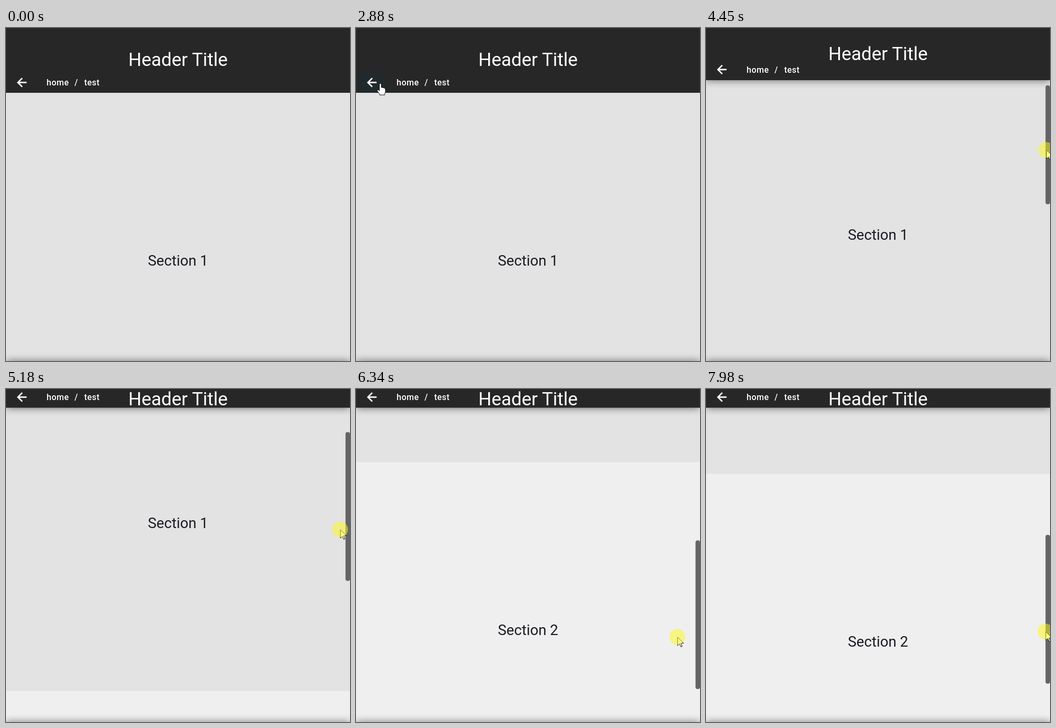
Recreate the animation shown at these times as an HTML page. Size 653 by 632 pixels, loop 8000 ms.

```html
<!DOCTYPE html>
<html lang="en">
<head>
<meta charset="utf-8">
<title>Collapsing header</title>
<style>
  html, body { margin: 0; width: 100%; height: 100%; overflow: hidden; background: #efefef; }
  svg { display: block; width: 653px; height: 632px; font-family: Roboto, sans-serif; }
  .section { font-size: 27.6px; fill: #1b1b23; text-anchor: middle; }
  .title { font-size: 35px; fill: #fff; text-anchor: middle; }
  .crumb { font-size: 16px; font-weight: 500; letter-spacing: .5px; fill: #fff; }
</style>
</head>
<body>
<svg viewBox="0 0 653 632">
  <defs>
    <filter id="soft" filterUnits="userSpaceOnUse" x="-60" y="-80" width="773" height="800">
      <feGaussianBlur stdDeviation="7.5"/>
    </filter>
    <clipPath id="bar"><rect id="barClip" width="653"/></clipPath>
  </defs>
  <g id="content">
    <rect width="653" height="637" fill="#e3e3e3"/>
    <rect y="637" width="653" height="640" fill="#efefef"/>
    <text class="section" x="326.5" y="328">Section 1</text>
    <text class="section" x="326.5" y="965">Section 2</text>
  </g>
  <rect y="632" width="653" height="40" fill="#000" opacity=".5" filter="url(#soft)"/>
  <g id="shade"><rect y="-40" width="653" height="41" fill="#000" opacity=".55" filter="url(#soft)"/></g>
  <rect id="thumb" x="644.5" width="8.5" rx="4"/>
  <rect id="header" width="653" fill="#272727"/>
  <g clip-path="url(#bar)">
    <g id="nav">
      <rect id="hover" y="-39" width="59" height="39" rx="19" fill="#20292c"/>
      <path transform="translate(16.6 -32.9) scale(1.11)" fill="#fff" stroke="#fff" stroke-width=".5"
        d="M20 11H7.83l5.59-5.59L12 4l-8 8 8 8 1.41-1.41L7.83 13H20v-2z"/>
      <text class="crumb" x="77" y="-14">home</text>
      <text class="crumb" x="130" y="-14">/</text>
      <text class="crumb" x="148.4" y="-14">test</text>
    </g>
    <text id="title" class="title" x="326.5">Header Title</text>
  </g>
  <g id="cursor">
    <path id="arrow" fill="#fff" stroke="#111" d="M.5 .5v16l3.7-3.6 2.6 6 2.4-1-2.6-5.9h5.2z"/>
    <path id="hand" fill="#fff" stroke="#111"
      d="M-2 1.5a1.8 1.8 0 0 1 3.6 0V7.5q1.5-1 3 .4 1.7-.6 2.7.7 2.2-.1 2.2 2V15q0 2.5-1.5 4V21.5H-1.5V20L-5.5 14.5q-1.2-1.8.2-2.6 1.3-.6 2.6.8l.7 1z"/>
    <circle id="press" r="15" fill="#fffa14"/>
  </g>
</svg>
<script>
const LOOP = 8000, FULL = 123, SLIM = 35, BOTTOM = 632, CONTENT = 1262, GRAB = 4160;
const el = Object.fromEntries([...document.querySelectorAll('[id]')].map(e => [e.id, e]));
const set = (e, attrs) => { for (const k in attrs) e.setAttribute(k, attrs[k]); };
const move = (e, x, y) => e.setAttribute('transform', `translate(${x.toFixed(2)} ${y.toFixed(2)})`);
const ramp = (t, a, b) => Math.min(1, Math.max(0, (t - a) / (b - a)));
const ease = (t, a, b) => (1 - Math.cos(Math.PI * ramp(t, a, b))) / 2;

// Eased moves between rests; each leg is [begin, end, ...where to]
const glide = (t, from, legs) => legs.reduce(
  (pos, [a, b, ...to]) => pos.map((v, i) => v + (to[i] - v) * ease(t, a, b)), from);

const scrollLegs = [
  [GRAB, 4450, 24.5], [4450, 5180, 99], [5230, 6340, 533],
  [6430, 6710, 289], [6710, 7080, 511], [7200, 7580, 293], [7580, 7980, 511]
];
const pointerLegs = [
  [20, 190, 589, 183], [340, 900, 634, 222], [1050, 1840, 157, 104],
  [1860, 2450, 46, 105.5], [2870, 3540, 634, 229], [3670, 3970, 646, 220]
];

function pointer(t, top) {
  if (t < GRAB) return glide(t, [614, 566], pointerLegs);
  const swing = Math.PI * Math.max(0, t - 4450) / 1890;
  return [628 + 18 * Math.cos(swing), 220 + .47 * top];
}

function draw(t) {
  const [top] = glide(t, [0], scrollLegs);
  const h = Math.max(SLIM, FULL - top);
  const view = BOTTOM - h;
  move(el.content, 0, h - top);
  set(el.header, { height: h + .5 * ramp(top, 0, 20) });
  set(el.barClip, { height: h });
  move(el.nav, 0, h);
  set(el.title, { y: 72 - (FULL - h) * 41 / 88 });
  move(el.shade, 0, h);
  set(el.shade, { opacity: ramp(top, 0, 12) });

  const grey = Math.round(140 - 40 * ramp(t, 3680, 3850));
  set(el.thumb, {
    y: h + top * view / CONTENT,
    height: view * view / CONTENT,
    fill: `rgb(${grey},${grey},${grey + 2})`,
    opacity: ramp(t, 380, 560) - ramp(t, 1600, 1800) + ramp(t, 3100, 3280)
  });

  const [x, y] = pointer(t, top);
  const over = (a, b) => y < FULL && x > a && x < b;
  const overBack = t < GRAB && over(0, 60);
  const overLink = overBack || over(76, 120) || over(147, 178);
  move(el.cursor, x, y);
  set(el.cursor, { opacity: +(t >= 30) });
  set(el.arrow, { opacity: +!overLink });
  set(el.hand, { opacity: +overLink });
  set(el.press, { opacity: t >= GRAB ? .5 : 0 });
  set(el.hover, { opacity: +overBack });
}

const start = performance.now();
function tick() {
  draw((performance.now() - start) % LOOP);
  requestAnimationFrame(tick);
}
tick();
</script>
</body>
</html>
```
